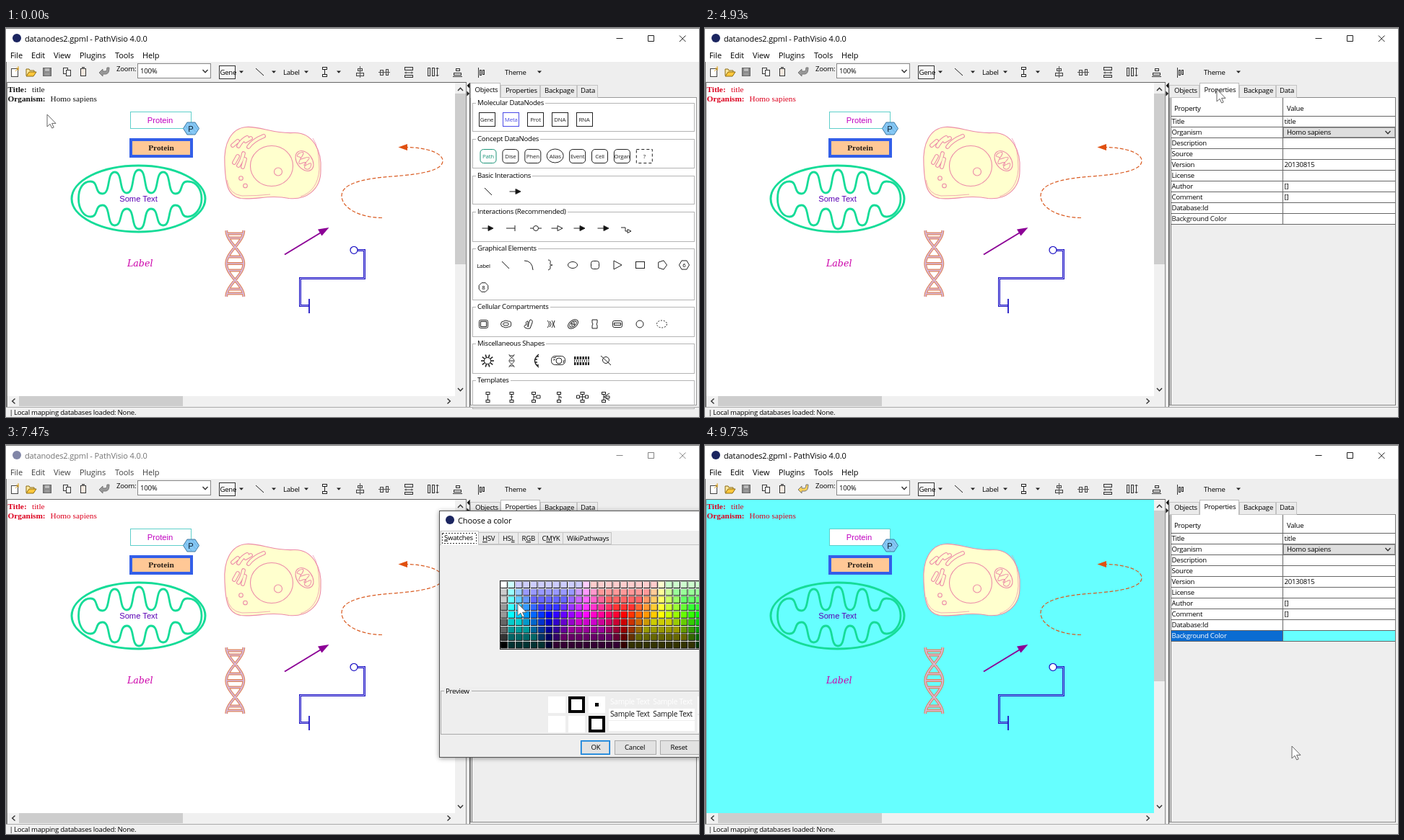
An HTML page for the animation above (9.79 s loop, 960 by 540 pixels).

```html
<!DOCTYPE html>
<html lang="en">
<head>
<meta charset="utf-8">
<title>PathVisio background color</title>
<style>
html, body { margin: 0; width: 100%; height: 100%; overflow: hidden; background: #fff; }
svg { display: block; width: 960px; height: 540px; }
text { font: 9.6px "Open Sans", "Noto Sans", sans-serif; letter-spacing: -.25px; white-space: pre; }
.win text, text.win { font-size: 11px; letter-spacing: -.12px; }
.node text { font-size: 7.9px; letter-spacing: -.2px; text-anchor: middle; }
.sample { font-size: 10.2px; }
.script { font: italic 12.6px "DejaVu Serif", serif; letter-spacing: 0; }
.arial { font: 11.2px "Liberation Sans", Arial, sans-serif; letter-spacing: 0; text-anchor: middle; }
.serif text, text.serif { font: 11.3px "Liberation Serif", serif; letter-spacing: 0; }
.serif .b, text.serif.b { font-weight: bold; }
rect { shape-rendering: crispEdges; }
.smooth rect { shape-rendering: auto; }
.ico { fill: none; stroke: #222; }
</style>
</head>
<body>
<svg id="stage" viewBox="0 0 960 540" xmlns="http://www.w3.org/2000/svg"></svg>
<script>
const LOOP = 9790, CYAN = '#66ffff';
const T = (x, y, s, more = '') => `<text x="${x}" y="${y}" ${more}>${s}</text>`;
const R = (x, y, w, h, fill = 'none', stroke = '', more = '') => stroke
  ? `<rect x="${x + .5}" y="${y + .5}" width="${w - 1}" height="${h - 1}" fill="${fill}" stroke="${stroke}" ${more}/>`
  : `<rect x="${x}" y="${y}" width="${w}" height="${h}" fill="${fill}" ${more}/>`;
const P = (d, more = '') => `<path d="${d}" fill="none" ${more}/>`;
const C = (x, y, r, more = '') => `<circle cx="${x}" cy="${y}" r="${r}" ${more}/>`;
const E = (x, y, a, b, more = '') => `<ellipse cx="${x}" cy="${y}" rx="${a}" ry="${b}" ${more}/>`;
const G = (inner, more = '') => `<g ${more}>${inner}</g>`;
const at = (x, y, inner, turn = 0) => G(inner, `transform="translate(${x} ${y}) rotate(${turn})"`);
const down = (x, y = 61) => P(`M${x - 3} ${y - 1.5}h6l-3 3.2z`, 'style="fill:#222"');
const chevron = (x, y, turn, color = '#333') =>
  P('M-3.5 -2L0 1.8 3.5 -2', `stroke="${color}" stroke-width="1.4" transform="translate(${x} ${y}) rotate(${turn})"`);
const poly = (n, r, a0 = 0) => 'M' + Array.from({length: n}, (_, i) => {
  const a = a0 + i * 2 * Math.PI / n;
  return (r * Math.cos(a)).toFixed(2) + ' ' + (r * Math.sin(a)).toFixed(2);
}).join('L') + 'Z';
// Curve through peaks and valleys with level tangents and steep flanks
const swing = pts => pts.slice(1).map(([x, y], i) => {
  const [px, py] = pts[i], k = (x - px) * .68;
  return `C${px + k} ${py} ${x - k} ${y} ${x} ${y}`;
}).join('');
const helix = (h, amp, turns, sign) => 'M' + Array.from({length: 41}, (_, i) =>
  (sign * amp * Math.cos(i / 40 * turns * 2 * Math.PI)).toFixed(2) + ' ' + (h * i / 40).toFixed(2)).join('L');

function titleBar() {
  return R(0, 0, 960, 47, '#fff') + R(0, 0, 960, 1, '#777') +
    G(C(15, 14, 6, 'fill="#1b2560"') + T(26, 18.6, 'datanodes2.gpml - PathVisio 4.0.0') +
      P('M845.5 14.5h9M889.5 10.5h8v8h-8zM933 10.5l8.5 8.5M941.5 10.5L933 19', 'stroke="#222"'), 'id="title" class="win"') +
    G([[6, 'File'], [35, 'Edit'], [66, 'View'], [102, 'Plugins'], [151, 'Tools'], [189, 'Help']]
      .map(([x, s]) => T(x, 42, s)).join(''), 'id="menu" class="win"');
}

function toolbar() {
  const sheet = (x, y) => R(x, y, 7, 9, '#fff', '#333');
  return R(0, 47, 960, 29, '#eee') +
    R(7, 56, 10, 12, '#fff', '#444') + P('M13 60l4-4m-3 0h4m-1-3v6', 'stroke="#d8a020"') +
    P('M28 66V57h4l1 2h6v2', 'stroke="#8a6a10" style="fill:#ffe9a0"') + P('M28 67l4-6h10l-4 6z', 'stroke="#8a6a10" style="fill:#ffc83c"') +
    R(51, 55, 12, 12, '#888', '#666') + R(54, 56, 6, 4, '#bbb') + R(54, 62, 6, 4, '#999') +
    sheet(79, 55) + sheet(83, 58) + R(103, 56, 8, 11, '#f3e9e0', '#333') + R(105, 54, 4, 3, '#666') +
    P('M129 62l5-5v3h4q2 0 2-5h3q0 9-5 9h-4v3z', 'id="undo" stroke="#777"') +
    T(153, 59.5, 'Zoom:') + R(182, 49, 102, 21, '#fff', '#888') + T(186, 63, '100%') + chevron(276, 60, 0) +
    R(295, 52, 23, 19, '#f6f6f6', '#333') + T(296.5, 64.5, 'Gene') + down(326) +
    P('M346 56l11 10', 'stroke="#222"') + down(371) + T(384, 64.5, 'Label') + down(416) +
    R(438, 54, 7, 4, '#fff', '#222') + R(438, 64, 7, 4, '#fff', '#222') + P('M441.5 58v6', 'stroke="#222"') + down(461) +
    R(487, 56, 7, 4, '#ddd', '#444') + R(485, 62, 11, 5, '#ddd', '#444') + P('M490.5 53v16', 'stroke="#555"') +
    R(518, 58, 5, 8, '#ddd', '#444') + R(526, 57, 4, 9, '#ddd', '#444') + P('M516 61.5h16', 'stroke="#555"') +
    R(552, 54, 12, 5, '#ddd', '#333') + R(552, 65, 12, 4, '#ddd', '#333') + P('M552 62h12m-10-1.5v3m8-3v3', 'stroke="#444"') +
    R(584, 55, 4, 12, '#ddd', '#333') + R(590, 55, 4, 12, '#ddd', '#333') + P('M597.5 55v12m-2-10l2-2 2 2m-4 8l2 2 2-2', 'stroke="#333"') +
    R(623, 56, 6, 4, '#ddd', '#333') + R(620, 62, 11, 4, '#ddd', '#333') + P('M619 67.5h13', 'stroke="#333"') +
    R(656, 58, 3, 8, '#ddd', '#333') + R(660, 58, 3, 7, '#ddd', '#333') + P('M654.5 55v14', 'stroke="#333"') +
    T(691, 64.5, 'Theme') + down(739);
}

function cellShape() {
  const pink = '#ec8aa8', line = `stroke="${pink}" stroke-width="1.1"`;
  const pods = 'M314 163l7-6M322 164q5-9 12-12M336 165q6-9 21-15M332 157l7-4M316 187l5-9M322 191q5-7 7-17M328 193l3-11';
  const pod = (c, w) => P(pods, `stroke="${c}" stroke-width="${w}" stroke-linecap="round" stroke-linejoin="round"`);
  return P('M303 190C301 160 312 139 333 137.5C352 136 370 147 398 145.5C425 144 438 171 436 198C436 225 415 239 392 236.5C365 231 345 239 325 236.5C305 233 304 212 303 190Z',
      line + ' style="fill:#ffffce"') +
    P('M425 153Q434 165 434 196Q432 226 408 234M306 211Q309 231 327 233Q348 233 366 231', `stroke="${pink}" stroke-width=".7"`) +
    G(E(368, 191.5, 29.5, 28) + C(377, 199.5, 5.5) + C(325.5, 208.5, 2.8) + C(331.5, 219, 2.8), line + ' fill="none"') +
    pod(pink, 5.8) + pod('#ffffce', 3.7) +
    at(413.5, 184.5, E(0, 0, 15.5, 10.5, line + ' fill="none"') +
      P('M-13 0C-11-10-8-4-6 2C-4 6-3-8 0-8C3-8 2 5 5 4C7 3 6-7 9-5C13-2 14 3 10 5C6 8 6 0 3 0C0 0 1 9-2 8C-5 7-5 0-8 2C-10 4-12 7-13 0', `stroke="${pink}"`), 54);
}

function dnaShape() {
  const d = helix(92, 12, 1, 1) + helix(92, 12, 1, -1) + 'M-12 4.5h24M-10 10.5h20M-9 36.5h18M-12 46h24M-9 55.5h18M-10 81.5h20M-12 87.5h24';
  return at(317.3, 281, P(d, 'stroke="#e0855a" stroke-width="3.9"') + P(d, 'stroke="#d6b8de" stroke-width="1.7"'));
}

function canvas() {
  const elbow = 'M487 308.5H496.5V347.5H407.5V385.5H420';
  const mid = 184.2, step = 16.8;
  const wave = (ys, dir) => ys.map((y, i) => [mid + dir * (i - 4) * step, y]);
  const upper = wave([213, 230, 200, 229, 197, 229, 200, 230, 213], 1);
  const lower = wave([262, 246, 274, 251, 279, 251, 274, 246, 262], -1);
  const mito = 'M100.5 237C100.5 222 107 213 117 213' + swing(upper) + 'C264 213 271 224 271 237C271 250 262 262 251.4 262' + swing(lower) + 'C107 262 100.5 250 100.5 237Z';
  return R(2, 76, 620, 435, '#fff', '', 'id="paper"') +
    G(T(2.5, 88.5, 'Title:', 'class="b"') + T(36, 88.5, 'title') + T(2.5, 102, 'Organism:', 'class="b"') + T(61.5, 102, 'Homo sapiens'), 'id="info" class="serif"') +
    R(172, 116, 85, 24, '#fff', '#5fcfca') + T(213.5, 131.5, 'Protein', 'class="arial" fill="#c000c0"') +
    P('M245.5 139.5L251 131H262L267.5 139.5L262 148H251Z', 'stroke="#3c78a0" style="fill:#86c8f5"') +
    P('M249 136l8 11M253 132l11 14M258 132l7 9', 'stroke="#6aaede" stroke-width=".8"') + T(256, 143.5, 'P', 'class="arial" fill="#123"') +
    R(171, 153, 88, 27, '#335fe8') + R(175, 157, 80, 19, '#ffc896') +
    T(215, 170, 'Protein', 'class="serif b" text-anchor="middle" fill="#2a2018"') +
    E(183.5, 237, 92.5, 46, 'fill="none" stroke="#16dc98" stroke-width="3"') + P(mito, 'stroke="#16dc98" stroke-width="2.8"') +
    T(183.5, 241, 'Some Text', 'class="arial" fill="#5a00b4"') +
    T(168, 331, 'Label', 'class="script" fill="#cc00aa"') +
    cellShape() + dnaShape() +
    P('M386 314.5L437 283.5', 'stroke="#8c0096" stroke-width="2"') + P('M447.5 277L437.5 288.5 432 279.5Z', 'style="fill:#8c0096"') +
    P('M521 263.5C488 263 465 249 465 233C465 216 494 209 535 206C578 203 605 197 605 184.5C605 173 582 166 555 165.5', 'stroke="#d95a20" stroke-width="1.2" stroke-dasharray="5 2.6"') +
    P('M543.5 165.5L556 161V170Z', 'style="fill:#e05010"') +
    P(elbow, 'stroke="#2016c4" stroke-width="3"') + P(elbow, 'id="core" stroke-width="1"') +
    C(482, 308.3, 5, 'fill="#fff" stroke="#2016c4" stroke-width="1.3"') + P('M420 376V396', 'stroke="#2016c4" stroke-width="1.8"');
}

function frameParts() {
  return R(0, 75, 638, 1, '#666') + R(0, 47, 1, 493, '#777') + R(1, 75, 1, 451, '#777') +
    R(622, 76, 15, 435, '#f0f0f0') + R(622, 91, 15, 237, '#cdcdcd') + chevron(629.5, 85, 180) + chevron(629.5, 502, 0) +
    R(2, 511, 635, 15, '#f0f0f0') + R(18, 511, 227, 14, '#cdcdcd') + chevron(10.5, 518, 90) + chevron(613.5, 518, -90) +
    R(637, 76, 6, 450, '#eee') + R(637, 76, 1, 450, '#888') + R(642, 76, 1, 450, '#555') +
    P('M642 76.5v7l-3.5-3.5zM638.5 87.5v7l3.5-3.5z', 'style="fill:#111"') +
    R(643, 76, 317, 450, '#eee') + R(0, 526, 960, 14, '#f0f0f0') + R(0, 526, 960, 1, '#aaa') +
    T(4.5, 536.8, '|') + T(11, 536.8, 'Local mapping databases loaded: None.');
}

function tabs(active) {
  const list = [[643, 42, 650, 'Objects'], [685, 55, 692, 'Properties'], [740, 51, 746, 'Backpage'], [791, 29, 796, 'Data']];
  return list.map(([x, w, tx, s], i) => i === active
    ? R(x, 76, w, 21, '#fff', '#bbb') + R(x + 1, 96, w - 2, 1, '#fff') + T(tx - .5, 89, s)
    : R(x, 79, w, 18, '#ebebeb', '#c4c4c4') + T(tx, 90.3, s)).join('');
}

function objectsPanel() {
  const groups = [[104, 40, 'Molecular DataNodes'], [154, 41, 'Concept DataNodes'], [205, 40, 'Basic Interactions'], [255, 42, 'Interactions (Recommended)'],
    [306, 72, 'Graphical Elements'], [387, 42, 'Cellular Compartments'], [438, 42, 'Miscellaneous Shapes'], [489, 40, 'Templates']];
  const pen = document.createElement('canvas').getContext('2d');
  pen.font = '9.6px "Open Sans", "Noto Sans", sans-serif';
  const boxes = groups.map(([y, h, s]) => R(646, y, 308, h, 'none', '#b4b4b4') +
    R(651, y - 4, pen.measureText(s).width - s.length * .25 + 4, 9, '#fff') + T(653, y + 3.4, s)).join('');
  const mol = ['Gene', 'Meta', 'Prot', 'DNA', 'RNA'].map((s, i) => {
    const x = 666 + i * 33.75, c = i === 1 ? '#4a4ae6' : '#222';
    return R(Math.round(x - 11.5), 117, 23, 20, '#fff', c) + T(x, 130.3, s, `fill="${c}"`);
  }).join('');
  const con = ['Path', 'Dise', 'Phen', 'Alias', 'Event', 'Cell', 'Organ', '?'].map((s, i) => {
    const x = 668 + i * 30.9, c = i ? '#222' : '#1c9478';
    const box = i === 3 ? E(x, 177.5, 11.5, 9.5, `fill="#fff" stroke="${c}"`)
      : R(x - 11.5, 168, 23, 20, '#fff', c, i === 7 ? 'stroke-dasharray="4 3"' : 'rx="4.5"');
    return box + T(x, 181, s, `fill="${c}"`);
  }).join('');
  const head = 'l-7-3.5v7z', fill = 'style="fill:#111"';
  const arrow = (x, y, f = fill) => at(x, y, P('M-7.5 0H2') + P('M8 0' + head, f));
  const interactions = arrow(705, 227) + P('M663 222l10 10') + arrow(667, 278) + P('M693 278h12m0-4v8') +
    at(734, 278, P('M-8 0h4M4 0h4') + C(0, 0, 3.5)) + arrow(763, 278, 'style="fill:#fff"') + arrow(794, 278) + arrow(827, 278) +
    P('M852 277h6v5h3m0-2.5v5l5-2.5z');
  const graphic = P('M687 324l10 10M718 323q11 0 12 13M751 322q4 0 3 4t3 3q-4 0-3 3t-3 4') + E(785, 329, 6.5, 4.5) + R(810, 323, 12, 12, 'none', '#222', 'rx="3"') +
    P('M842 323v12l11-6z') + R(872, 324, 13, 10, 'none', '#222') + at(909, 329, P(poly(5, 6.5))) + at(939.5, 329, P(poly(6, 7))) + at(661.5, 360, P(poly(8, 6.8, .39)));
  const comps = R(655, 405, 13, 12, 'none', '#222', 'rx="2"') + R(657, 407, 9, 8, 'none', '#222') + at(692.5, 411, P('M-7 0q0-4 4-4q3-2 6 0q5 0 4 4q1 4-4 4q-3 2-6 0q-4 0-4-4z') + E(0, 0, 4, 2)) +
    at(724, 411, P('M-5 5q-3-3 2-4q-2-5 2-5v8q1-6 3-10q4 0 3 4l-3 8q-4 1-7-1z')) + at(755, 411, P('M-5-5q5 5 0 10M-2-4q4 4 0 8M1-5q4 5 0 10M5-5q-3 5 0 10')) +
    at(785.5, 411, E(0, 0, 8, 5) + E(0, 0, 5.5, 3) + P('M-3 2l2-4 2 4 2-4'), -38) +
    P('M812 405h7v4q-2 2 0 4v4h-7v-4q2-2 0-4z') + R(840, 406, 14, 10, 'none', '#222', 'rx="2"') + R(842, 409, 10, 4, 'none', '#222') +
    C(878, 411, 5) + E(908.5, 411, 7, 5, 'stroke-dasharray="2 1.8"');
  const rays = Array.from({length: 10}, (_, i) => P('M4.5 0H9', `transform="rotate(${i * 36})" stroke-width="1.6"`)).join('');
  const misc = at(667, 462, C(0, 0, 4.5) + rays) + at(700.5, 453, P(helix(18, 3.5, 1, 1) + helix(18, 3.5, 1, -1) + 'M-3 2h6M-3 9h6M-3 16h6')) +
    at(735, 453, P('M3 0Q-8 9 3 18M3 3h-3M-2 7h3M-2 11h3M3 15h-3', 'stroke-width="1.4"')) + R(755, 455, 20, 13, 'none', '#222', 'rx="5"') + C(766, 462, 4) + P('M758 458l4-1m-4 4l3-1m11 5l1-4') +
    at(797, 462, P('M-10-4H11M-10 4H11', 'stroke-width="4" stroke-dasharray="2.5 1.3"') + P('M-10 0H11', 'stroke-dasharray="1 1.8" stroke-width="3"')) +
    C(831, 461, 4.5) + P('M824 455l14 13');
  const twig = (x, d) => at(x, 512, R(-3, -7, 6, 4, '#fff', '#222') + R(-3, 4, 6, 4, '#fff', '#222') + P('M0-3V4' + d));
  const templates = twig(667.5, '') + twig(700.5, 'M-2 0h4') + twig(731, 'M0 0h4m0-2h5v4h-5z') + twig(766, 'M0 0h3v2') + twig(798.5, 'M-8-2h4v4h-4zM-4 0H4m0-2h4v4h-4z') + twig(828, 'M0 0l8-5M0 0l8 5M3-1h5v3H3z');
  return R(643, 96, 314, 428, '#fff', '#999') + tabs(0) + boxes +
    G(mol + con + T(661.5, 332.5, 'Label') + T(939.5, 332, '6') + T(661.5, 363, '8'), 'class="node smooth"') +
    G(interactions + graphic + comps + misc + templates, 'class="ico smooth"') + R(643, 524, 317, 2, '#eee');
}

function propertiesPanel() {
  const rows = [['Title', 'title'], ['Organism', ''], ['Description', ''], ['Source', ''], ['Version', '20130815'], ['License', ''],
    ['Author', '[]'], ['Comment', '[]'], ['Database:Id', ''], ['Background Color', '']];
  let s = R(643, 96, 314, 428, '#eee', '#888') + R(645, 97, 311, 176, '#fff') + tabs(1) + T(650, 114.5, 'Property') + T(806, 114.5, 'Value');
  s += R(645, 258, 155, 14, '#0a6cd2', '', 'id="rowSel"') + R(801, 258, 155, 14, '#fff', '', 'id="swatch"') + R(801, 138, 155, 14, '#dedede', '#999');
  rows.forEach(([k, v], i) => {
    const y = 122 + i * 15;
    s += R(645, y, 311, 1, '#666') + T(646.5, y + 11.3, k, i === 9 ? 'id="rowName"' : '') + T(802.5, y + 11.3, v);
  });
  return s + R(645, 272, 311, 1, '#666') + R(800, 97, 1, 176, '#666') + R(645, 97, 1, 426, '#777') + R(956, 97, 1, 427, '#777') +
    T(806, 148.3, 'Homo sapiens') + chevron(946, 145, 0);
}

// Each cell has a black right and bottom edge on a white ground
function palette() {
  const clamp = (v, a, b) => Math.max(a, Math.min(b, v)), grey = [255, 204, 204, 153, 153, 102, 102, 51, 0];
  let s = R(684, 188, 280, 96, '#fff', '#222');
  for (let row = 0; row < 9; row++) for (let col = 0; col < 27; col++) {
    const lo = row < 5 ? 204 - 51 * row : 0, hi = row < 5 ? 255 : 204 - 51 * (row - 5);
    const part = mid => {
      const d = Math.abs(col - 1 - mid), ring = Math.min(d, 30 - d);
      return clamp(51 * clamp(10 - ring, 0, 5), lo, hi);
    };
    const rgb = col ? [part(15), part(25), part(5)] : Array(3).fill(grey[row]);
    s += at((685.3 + col * 10.4).toFixed(1), (189.5 + row * 10.42).toFixed(1), R(0, 0, 9.45, 9.45, '#000') + R(0, 0, 8.5, 8.5, `rgb(${rgb})`));
  }
  return G(s, 'class="smooth"');
}

function preview(c) {
  const sample = (y, fill) => T(837, y, 'Sample Text  Sample Text', `class="sample" fill="${fill}"`);
  return R(751, 349, 24, 23, '#fff') + R(755, 353, 15, 15, c) + R(760, 358, 5, 5, '#fff') +
    R(779, 349, 23, 23, '#000') + R(783, 353, 15, 15, c) + R(788, 358, 5, 5, '#fff') +
    R(807, 349, 23, 23, '#fff') + R(811, 353, 15, 15, c) + R(816, 358, 5, 5, '#000') +
    R(751, 376, 24, 23, c) + R(779, 376, 23, 23, '#fff') + R(783, 380, 15, 15, c) + R(807, 376, 23, 23, '#000') + R(811, 380, 15, 15, c) +
    R(835, 366, 119, 16, c) + R(835, 383, 119, 14, '#fff') + sample(360, c) + sample(377.3, '#111') + sample(394, c) +
    R(958, 349, 2, 24, '#fff') + R(958, 375, 2, 24, c);
}

function dialog() {
  const u = s => `<tspan text-decoration="underline">${s}</tspan>`;
  const tab = (x, w, tx, s) => R(x, 121, w, 17, '#ebebeb', '#c4c4c4') + T(tx, 133.3, s);
  const button = (x, w, tx, s, line) => R(x, 410, w, 20, '#e2e2e2', line) + T(tx, 423.3, s);
  return R(600, 91, 370, 343, '#eee', '#555', 'style="filter:drop-shadow(0 1px 3px #0006)"') + R(601, 92, 359, 27, '#fff') +
    C(615, 104, 6, 'fill="#1b2560"') + T(626, 108.6, 'Choose a color', 'class="win"') +
    tab(654, 29, 660, u('H') + 'SV') + tab(682, 28, 688, 'HS' + u('L')) + tab(709, 29, 714.5, 'R' + u('G') + 'B') +
    tab(737, 35, 742.5, 'C' + u('M') + 'YK') + tab(771, 68, 777, 'WikiPathways') +
    R(601, 138, 359, 198, '#f0f0f0') + R(601, 138, 359, 1, '#c4c4c4') +
    R(602, 119, 53, 20, '#fff', '#c4c4c4') + R(603, 138, 51, 1, '#fff') + T(607, 131.7, u('S') + 'watches') +
    R(604, 122, 48, 15, 'none', '#333', 'id="focus" stroke-dasharray="2 2"') + palette() +
    P('M696 211l9 9M705 211l-9 9', 'id="pick" stroke="#a33"') +
    R(602, 341, 370, 61, 'none', '#aaa') + R(607, 339, 38, 5, '#eee') + T(609, 344.5, 'Preview') +
    G(preview('#fff'), 'id="before"') + G(preview(CYAN), 'id="after"') +
    button(796, 41, 810.5, 'OK', '#0078d7') + R(797, 411, 39, 18, 'none', '#5aa4e0') + button(843, 58, 857, 'Cancel', '#aaa') + button(906, 60, 920.5, 'Reset', '#aaa');
}

const stage = document.getElementById('stage');
stage.innerHTML = titleBar() + toolbar() + canvas() + frameParts() + G(objectsPanel(), 'id="objects"') + G(propertiesPanel(), 'id="props"') +
  G(dialog(), 'id="dialog"') + P('M0 0V17L4 13.3 6.7 19 9.2 18 6.6 12.4H12Z', 'id="cursor" stroke="#666" stroke-linejoin="round" style="fill:#fff"');

const id = name => document.getElementById(name);
const show = (name, on) => id(name).setAttribute('display', on ? 'inline' : 'none');
const paint = (name, color) => { id(name).style.fill = color; };

// Pointer stops: time, x, y
const stops = [[0, 57, 120], [470, 57, 120], [1000, 25, 88], [2000, 25, 88], [3600, 645, 125], [3800, 645, 125], [4350, 709, 85], [5200, 709, 85],
  [6100, 825, 264], [6700, 825, 264], [7450, 709, 220], [7800, 699, 213], [8200, 699, 213], [8950, 814, 424], [9200, 814, 424], [9600, 813, 418], [LOOP, 813, 418]];

function pointer(t) {
  const i = Math.max(1, stops.findIndex(s => s[0] > t));
  const [t0, x0, y0] = stops[i - 1], [t1, x1, y1] = stops[i];
  const k = (t - t0) / (t1 - t0), e = k * k * (3 - 2 * k);
  return [x0 + (x1 - x0) * e, y0 + (y1 - y0) * e];
}

function draw(t) {
  const open = t >= 6600 && t < 9350, picked = t >= 8000, done = t >= 9400, selected = t >= 6450;
  paint('info', t >= 1400 ? '#dc001e' : '#111');
  show('objects', t < 4500);
  show('props', t >= 4500);
  show('dialog', open);
  show('focus', !picked);
  show('pick', picked);
  show('before', !picked);
  show('after', picked);
  show('rowSel', selected);
  paint('rowName', selected ? '#fff' : '#111');
  paint('swatch', done ? CYAN : '#fff');
  paint('paper', done ? CYAN : '#fff');
  id('core').style.stroke = done ? '#7cb4ee' : '#b4b0f2';
  paint('undo', done ? '#ffd25a' : '#999');
  id('title').setAttribute('opacity', open ? .55 : 1);
  id('menu').setAttribute('opacity', open ? .75 : 1);
  id('cursor').setAttribute('transform', `translate(${pointer(t).map(v => v.toFixed(1)).join(' ')})`);
}

const start = performance.now();
function tick(now) {
  draw(Math.max(0, now - start) % LOOP);
  requestAnimationFrame(tick);
}
draw(0);
requestAnimationFrame(tick);
</script>
</body>
</html>
```
